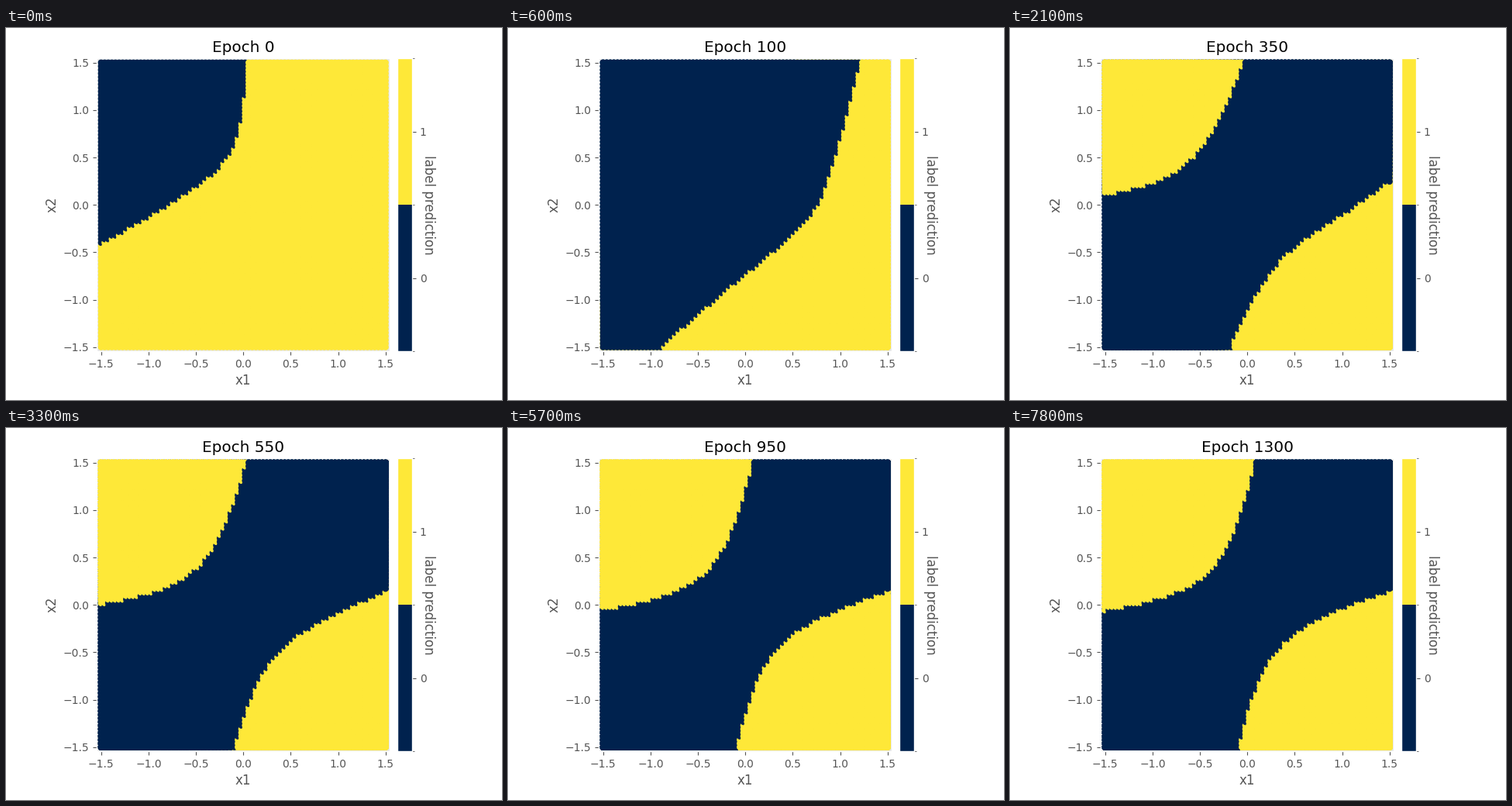
Animation, 640 px wide and 480 px high, one loop 8000 ms. Source, as a matplotlib script:

```python
import numpy as np
import matplotlib.pyplot as plt
from matplotlib.animation import FuncAnimation
from matplotlib.colors import ListedColormap

GRAY = "#555555"
W, H, DPI = 640, 480, 100
LEFT, TOP, SIDE = 117.2, 39.2, 378
LIMIT = 1.545
FRAME_MS, STEP_MS, LOOP_MS = 100, 300, 8000

plt.rcParams.update({
    "font.family": "DejaVu Sans", "font.size": 10,
    "axes.facecolor": "#E5E5E5", "axes.edgecolor": "white",
    "axes.linewidth": 1, "axes.labelcolor": GRAY, "axes.labelsize": 12,
    "axes.titlesize": 14.4, "xtick.color": GRAY, "ytick.color": GRAY,
})

# Column by column, upwards: later dots overlap earlier ones.
axis = np.linspace(-1.5, 1.5, 80)
gx, gy = (g.ravel() for g in np.meshgrid(axis, axis, indexing="ij"))
points = np.column_stack([gx, gy])
rim = np.maximum(abs(gx), abs(gy)) > 1.499

# Stage pixels, turned by 45 degrees: along and across the dark band.
scale = SIDE / (2 * LIMIT)
px = LEFT + SIDE / 2 + scale * gx
py = TOP + SIDE / 2 - scale * gy
along, across = px - py - 3, px + py

PIVOT = 80
LEVEL_STEPS = np.array([0, 2, 4, 7, 15, 22])
LOWER_LEVELS = [456, 635, 650, 651, 639, 632]
UPPER_LEVELS = [-50, 130, 312, 404, 436, 443]


def unsettled(step):
    """Share of the initial state that is left after some training."""
    return np.exp(-(step / 5.6) ** 1.3)


def bend(centre, width, tilt, curve):
    """Hyperbola along the band that is zero at the pivot."""
    def height(s):
        return tilt * s + curve * np.hypot(s - centre, width)
    return height(along) - height(PIVOT)


def boundary(step, levels, start, end):
    rest = unsettled(step)
    level = np.interp(1 - rest, 1 - unsettled(LEVEL_STEPS), levels)
    return level + rest * start + (1 - rest) * end


def predict(step):
    drift = 70 * (1 - unsettled(step))
    lower = boundary(step, LOWER_LEVELS,
                     bend(132 + drift, 76, -0.33, -0.64),
                     bend(60, 110, -0.07, 0.63))
    upper = boundary(step, UPPER_LEVELS,
                     bend(-10, 40, 0.3, -0.4),
                     bend(62, 105, 0.06, -0.73))
    dark = (upper < across) & (across < lower)
    return (~dark).astype(float)


labels = [predict(step) for step in range(-(-LOOP_MS // STEP_MS))]


def add_axes(x, y, w, h):
    return fig.add_axes([x / W, 1 - (y + h) / H, w / W, h / H])


fig = plt.figure(figsize=(W / DPI, H / DPI), dpi=DPI, facecolor="white")
ax = add_axes(LEFT, TOP, SIDE, SIDE)
ax.set(xlim=(-LIMIT, LIMIT), ylim=(-LIMIT, LIMIT), xlabel="x1", ylabel="x2")
ticks = np.arange(-1.5, 1.6, 0.5)
ax.set_xticks(ticks)
ax.set_yticks(ticks)
title = ax.set_title("Epoch 0")

cividis = plt.get_cmap("cividis")
two_tone = ListedColormap([cividis(0.0), cividis(1.0)])
dots = ax.scatter(gx, gy, c=labels[0], s=20, linewidths=1.5,
                  cmap=two_tone, vmin=0, vmax=1)

cax = add_axes(LEFT + SIDE + 10, TOP, SIDE * 0.05, SIDE)
bar = fig.colorbar(dots, cax=cax)
bar.set_ticks([0.25, 0.75], labels=["0", "1"])
bar.set_ticks([0, 0.5, 1], minor=True)
fig.text(544.7 / W, 1 - 228.5 / H, "label prediction", rotation=270,
         ha="center", va="center", size=12, color=GRAY)


def update(frame):
    step = frame * FRAME_MS // STEP_MS
    # Earlier layers stay underneath and show through at the soft outer rim.
    dots.set_offsets(np.vstack([points[rim]] * step + [points]))
    dots.set_array(np.concatenate([old[rim] for old in labels[:step]]
                                  + [labels[step]]))
    title.set_text(f"Epoch {50 * step}")
    return dots, title


anim = FuncAnimation(fig, update, frames=LOOP_MS // FRAME_MS,
                     init_func=lambda: (dots, title),
                     interval=FRAME_MS, repeat=True, repeat_delay=0)
plt.show()
```
